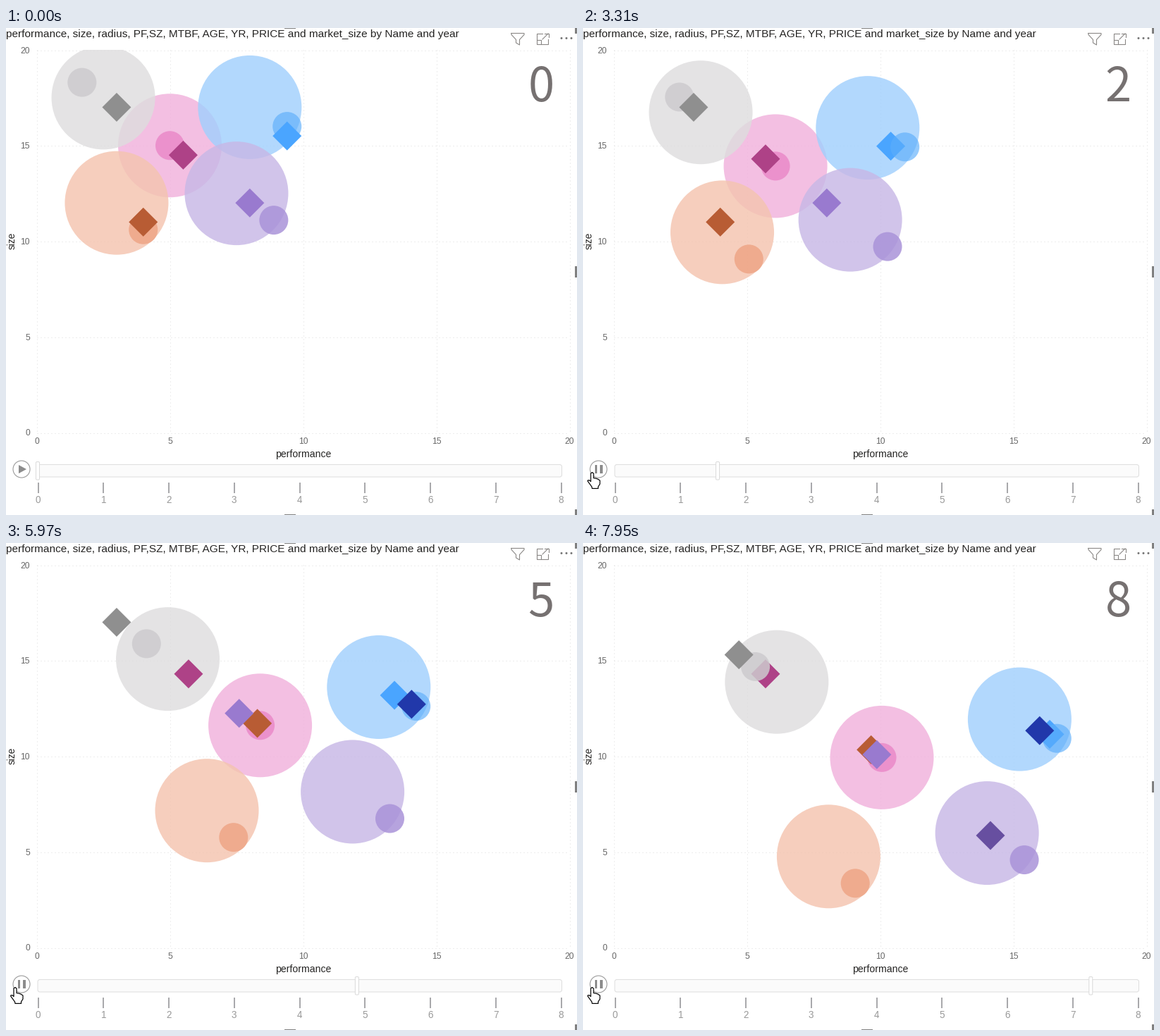
Recreate the animation shown at these times as a matplotlib script. Size 810 px wide and 691 px high, loop 8 s.

```python
import math

import matplotlib.pyplot as plt
import numpy as np
from matplotlib.animation import FuncAnimation
from matplotlib.patches import Circle, FancyBboxPatch, Polygon, Rectangle

W, H, DPI = 810, 691, 64
PT = 72 / DPI            # points per pixel
STEP = 40                # ms per frame
FRAMES = 8000 // STEP

CURSOR_IN, PRESSED, STARTED = 730, 1250, 2120   # ms
TICK = 67                # ms between screen updates during playback
YEAR_STEP = 0.0827       # years per update
LAG = 0.04               # marks trail the slider by this many years

plt.rcParams["font.family"] = "Liberation Sans"
fig = plt.figure(figsize=(W / DPI, H / DPI), dpi=DPI, facecolor="white")
ax = fig.add_axes([0, 0, 1, 1])
ax.set_xlim(0, W)
ax.set_ylim(H, 0)
ax.axis("off")


def to_px(x, y):
    return np.array([43.6 + 37.78 * x, 574 - 27.15 * y])


def rgb(code):
    return np.array([int(code[i:i + 2], 16) for i in (0, 2, 4)]) / 255


def pure(shown, back, alpha):
    """Colour that looks like `shown` when laid over `back` with alpha."""
    return np.clip((shown - (1 - alpha) * back) / alpha, 0, 1)


def label(x, y, s, size, color, **kw):
    kw = {"ha": "center", "va": "baseline", **kw}
    return ax.text(x, y, s, fontsize=size * PT, color=color, **kw)


def line(xs, ys, color, width=1.0, **kw):
    return ax.plot(xs, ys, color=color, lw=width * PT, **kw)[0]


def add(patch, z):
    patch.set_zorder(z)
    return ax.add_patch(patch)


# ---- grid and titles ----
for v in range(0, 21, 5):
    x, y = to_px(v, v)
    gx, gy = math.floor(x) + 0.5, math.floor(y) + 0.5
    dots = dict(color="#dcdcdc", zorder=1, ls=(0, (1, 4)))
    line([gx, gx], [31, 574], **dots)
    line([44, 799], [gy, gy], **dots)
    label(x + 0.3, 589.5, str(v), 12, "#666666")
    label(34, y + 4.5, str(v), 12, "#666666", ha="right")

label(0, 13, "performance, size, radius, PF,SZ, MTBF, AGE, YR, PRICE "
      "and market_size by Name and year", 15.4, "#252423", ha="left")
label(421.3, 609, "performance", 14, "#252423")
label(9, 302, "size", 13.8, "#252423", rotation=90, va="center")

# ---- header icons: funnel, focus mode, dots ----
ICON = "#8a8886"
line([717, 735, 735, 728.5, 728.5, 723.5, 723.5, 717, 717],
     [7.5, 7.5, 9.5, 16.5, 24, 21, 16.5, 9.5, 7.5], ICON, 1.1)
line([761, 752.5, 752.5, 768.5, 768.5], [7.5, 7.5, 22.5, 22.5, 16], ICON, 1.1)
line([752.5, 758.5, 758.5], [16.5, 16.5, 22.5], ICON, 1.1)
line([764, 769.5, 769.5], [7.5, 7.5, 13], ICON, 1.1)
line([761, 769], [16, 8], ICON, 1.1)
for k in range(3):
    add(Circle((788 + 7 * k, 14.5), 1.5, fc="#777777", lw=0), 2)

# ---- selection handles on the frame ----
for y in (0, 690):
    add(Rectangle((395, y), 16, 1, fc="#808080", lw=0), 2)
for y, h in ((0, 8), (338, 16), (683, 8)):
    add(Rectangle((807, y), 3, h, fc="#808080", lw=0), 2)

# ---- year slider ----
add(FancyBboxPatch((48, 622.5), 737.5, 11.5, boxstyle="round,pad=3",
                   fc="#fbfbfb", ec="#dedede", lw=PT), 2)


def slider_x(year):
    return 45.5 + 92.75 * year


for yr in range(9):
    x = slider_x(yr)
    line([x, x], [645, 660], "#a9a9ac", 2, solid_capstyle="butt")
    label(x, 674, str(yr), 13.5, "#999999")
handle = add(FancyBboxPatch((0, 0), 1, 1,
                            boxstyle="round,pad=0,rounding_size=1.5",
                            fc="white", ec="#dadada", lw=PT), 3)

# ---- play button and cursor ----
add(Circle((22, 626), 12, fc="white", ec="#9a9a9a", lw=1.1 * PT), 3)
play = add(Polygon([(18, 620), (29, 626), (18, 632)], fc="#8c8c8c", lw=0), 4)
bars = [add(Rectangle((x, 620), 3.6, 12, fc="#8c8c8c", lw=0), 4)
        for x in (16.8, 24)]

HAND = np.array([
    (11, 632), (13, 630.5), (15, 632), (15, 638.5), (18, 639), (21, 640),
    (24, 642), (24, 647), (21.5, 651), (21.5, 653.4), (13, 653.4),
    (12.5, 651), (6.7, 643), (7, 641.7), (9, 641.7), (11, 643.5)])
hand = add(Polygon(HAND, fc="white", ec="black", lw=1.2 * PT,
                   joinstyle="round"), 20)

# ---- year counter; the figure 1 is drawn without a foot ----
GREY = "#767171"
counter = label(759, 103.5, "0", 67, GREY, family="Noto Sans CJK JP")
one = add(Polygon([(748, 62.5), (759.5, 55), (766, 55), (766, 103.5),
                   (759.7, 103.5), (759.7, 62), (748, 69.5)], fc=GREY, lw=0), 5)

# ---- bubbles: each pair drifts at a steady rate per year ----
BIG_R, SMALL_R, BIG_A = 73.5, 20.5, 0.82
clip = Rectangle((43, 30.5), 757, 544, transform=ax.transData)
# base colour, small alpha, big start, small offset, drift
BUBBLES = [
    ("eb91cd", 0.85, (5, 15), (0, 0), (0.7, -0.7)),
    ("7abdfc", 0.65, (8, 17), (1.4, -1), (1, -0.7)),
    ("d0cfd1", 0.85, (2.5, 17.5), (-0.8, 0.8), (0.5, -0.5)),
    ("efab8e", 0.85, (3, 12), (1, -1.4), (0.7, -1)),
    ("b09adc", 0.85, (7.5, 12.5), (1.4, -1.4), (0.9, -0.9)),
]


def mark(patch, z):
    add(patch, z).set_clip_path(clip)
    return patch


discs = []
for n, (code, alpha, start, offset, drift) in enumerate(BUBBLES):
    base, start, drift = rgb(code), np.array(start), np.array(drift)
    tint = 1 - 0.58 * (1 - base)
    big = Circle((0, 0), BIG_R, fc=pure(tint, 1, BIG_A), alpha=BIG_A, lw=0)
    small = Circle((0, 0), SMALL_R, fc=pure(base, tint, alpha), alpha=alpha, lw=0)
    discs.append((mark(big, 5 + n / 10), start, drift))
    discs.append((mark(small, 7 + n / 10), start + offset, drift))

# ---- diamonds: rest, then straight legs (from year, to year, dx, dy) ----
DIAMONDS = [
    ("4aa5ff", 6.5, (9.4, 15.5), [(0.8, 3, 3, -1.6), (4, 8, 4.9, -3.4)]),
    ("ae4287", 7.05, (5.5, 14.5), [(0, 1, 0.2, -0.2)]),
    ("8f8f8f", 8.1, (3, 17), [(5, 6, 1.7, -1.7)]),
    ("b85c34", 8.2, (4, 11),
     [(2, 3, 2.2, 0), (3, 4, 1.6, 1.2), (4, 8, 2.3, -2.3)]),
    ("997acf", 8.3, (8, 12), [(2, 3, -1.2, 1), (4, 8, 3.8, -3.6)]),
    ("2138aa", 8.4, (13.4, 13.2), [(4, 8, 3.2, -2.3)]),
    ("674fa0", 8.5, (13.4, 6.6), [(6, 8, 1.2, -1.2)]),
]
FADE_IN = {"2138aa": 2, "674fa0": 5}    # year in which a late mark appears
TIP = SMALL_R * np.array([(0, -1), (1, 0), (0, 1), (-1, 0)])

diamonds = [(mark(Polygon(TIP, fc=rgb(code), lw=0), z), np.array(start), legs,
             FADE_IN.get(code, -1)) for code, z, start, legs in DIAMONDS]
blue = diamonds[0][0]


def clamp(v):
    return min(1.0, max(0.0, v))


def travel(start, legs, q):
    return start + sum(clamp((q - a) / (b - a)) * np.array([dx, dy])
                       for a, b, dx, dy in legs)


def year_at(t):
    if t < STARTED:
        return 0.0
    return 0.086 + YEAR_STEP * round((t - STARTED) / TICK)


def draw(i):
    t = i * STEP + 30
    year = year_at(t)
    q = max(0.0, year - LAG)

    for disc, start, drift in discs:
        disc.center = to_px(*(start + drift * q))
    for d, start, legs, enter in diamonds:
        d.set_xy(TIP + to_px(*travel(start, legs, q)))
        d.set_alpha(clamp(q - enter))
    blue.set_zorder(6.5 if year else 8)

    n = math.ceil(year)
    one.set_visible(n == 1)
    counter.set_text("" if n == 1 else str(n))
    handle.set_bounds(slider_x(year) - 3, 615.5, 5, 25.5)

    playing = t >= PRESSED
    play.set_visible(not playing)
    for b in bars:
        b.set_visible(playing)

    # the cursor slides in from the left, overshoots and settles
    hand.set_visible(t >= CURSOR_IN)
    s = clamp(math.floor((t - CURSOR_IN) / 66) / 5)
    hand.set_xy(HAND + (np.interp(s, [0, 0.6, 1], [-14, 8, 0]),
                        -3 * math.sin(math.pi * s)))
    return []


anim = FuncAnimation(fig, draw, frames=FRAMES, interval=STEP,
                     init_func=lambda: draw(0), repeat=True, repeat_delay=0)
plt.show()
```
